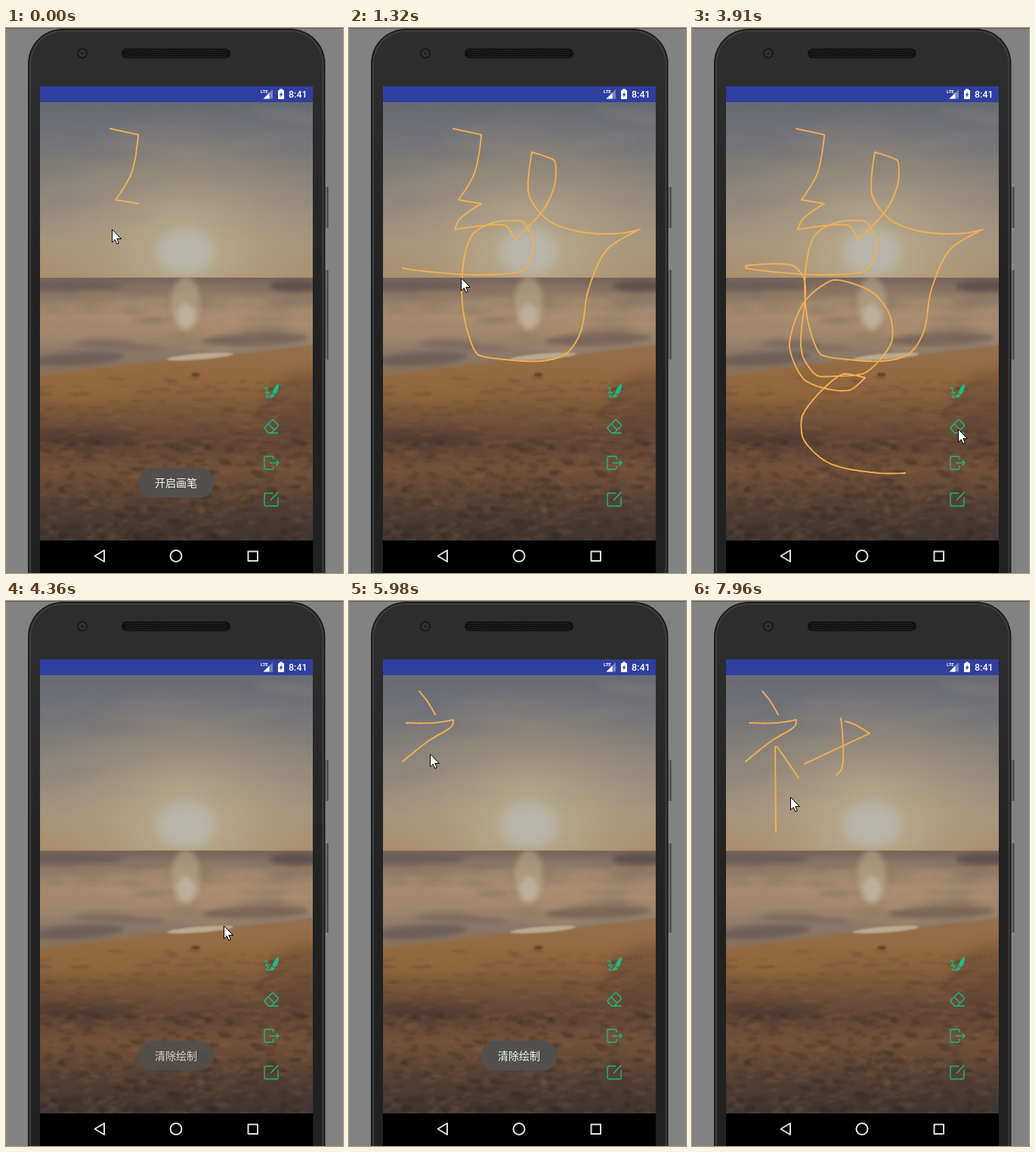
An HTML page with a canvas for the animation above (8 s loop, 446 px wide and 720 px high).

```html
<!DOCTYPE html>
<html lang="zh">
<head>
<meta charset="utf-8">
<style>
html, body { margin: 0; width: 100%; height: 100%; overflow: hidden; background: #828282; }
canvas { display: block; width: 446px; height: 720px; }
</style>
</head>
<body>
<canvas id="stage" width="446" height="720"></canvas>
<script>
const W = 446, H = 720, LOOP = 8000, CLEAR = 4170, STEP = 135;
const ctx = document.getElementById('stage').getContext('2d');

const clamp = (v, a = 0, b = 1) => Math.min(b, Math.max(a, v));
const mix = (a, b, u) => a + (b - a) * u;
const ramp = (t, a, b) => clamp((t - a) / (b - a));
const points = s => s.trim().split(/\s+/).map(p => p.split(',').map(Number));

// The screen refreshes in even steps of about STEP between these moments
const marks = [0, 120, 1170, 2280, 2520, 2800, 3910, 5050, 6100, 7180, 7960, LOOP];
function refresh(time) {
  const k = marks.findLastIndex(m => m <= time), span = marks[k + 1] - marks[k];
  const step = span / Math.max(1, Math.round(span / STEP));
  return marks[k] + Math.floor((time - marks[k]) / step) * step;
}

// Curve through key points: smooth on gentle turns, sharp at corners
function unit([ax, ay], [bx, by]) {
  const d = Math.hypot(bx - ax, by - ay) || 1;
  return [(bx - ax) / d, (by - ay) / d];
}
function heading(pts, k) {
  if (k === 0 || k === pts.length - 1) return [0, 0];
  const u = unit(pts[k - 1], pts[k]), v = unit(pts[k], pts[k + 1]);
  const bend = Math.max(0, u[0] * v[0] + u[1] * v[1]);
  return [0, 1].map(i => (u[i] + v[i]) / 2 * bend);
}
function at(pts, pos) {
  const k = Math.min(Math.floor(pos), pts.length - 2), u = pos - k, w = 1 - u;
  const p = pts[k], q = pts[k + 1], hp = heading(pts, k), hq = heading(pts, k + 1);
  const reach = Math.hypot(q[0] - p[0], q[1] - p[1]) * .36;
  return [0, 1].map(i => w * w * w * p[i] + 3 * w * w * u * (p[i] + hp[i] * reach)
    + 3 * w * u * u * (q[i] - hq[i] * reach) + u * u * u * q[i]);
}

// keys: [time, drawn up to point, cursor at point]
const moves = [];
const move = (path, keys) => moves.push({ pts: points(path), keys });
const stroke = (t0, t1, path) => {
  const n = points(path).length - 1;
  move(path, [[t0, 0, 0], [t1, n, n]]);
};
const hover = (t0, t1, path) => move(path, [[t0, 0, 0], [t1, 0, points(path).length - 1]]);

move(`138,133 175,141 166,192 145,227 175,232 146,253 140,266 208,261 220,279 258,239
  273,203 272,175 242,164 238,220 262,253 300,268 361,271 385,266 342,292 317,345
  306,403 290,428 268,438 207,438 170,431 152,380 154,296 165,271 195,256 230,256
  245,285 232,320 170,326 71,317 71,314 134,314 148,330 146,432 165,459 190,460
  230,455 264,415 262,380 240,350 187,333 150,360 129,420 148,464 180,477 210,478
  229,462 200,457 146,512 147,542 178,573 247,588 282,588`,
  [[0, 4, 5.88], [1020, 26, 27], [1300, 33, 35.85], [2130, 50, 50.2], [2510, 56, 56]]);
hover(2520, 2790, '281,590 281,590');
hover(2800, 3910, '283,591 340,600 374,590 352,530');
hover(3915, CLEAR, '352,530 352,530');
stroke(4850, 5050, '93,119 104,133 114,150');
stroke(5300, 5850, '76,161 112,161 138,157 137,164 105,185 71,212');
hover(5960, 5990, '107,202 107,202');
stroke(6090, 6500, '110,192 111,305');
stroke(6700, 7000, '112,192 125,210 141,234');
stroke(7180, 7500, '203,159 215,163 235,175 149,215');
stroke(7600, 7800, '197,155 198,222 191,230');
hover(7950, LOOP, '130,259 130,259');

function sample(keys, t, col) {
  let k = 0;
  while (k < keys.length - 2 && t >= keys[k + 1][0]) k++;
  return mix(keys[k][col], keys[k + 1][col], ramp(t, keys[k][0], keys[k + 1][0]));
}
const first = m => m.keys[0][0];
const last = m => m.keys.at(-1)[0];

function cursorAt(t) {
  const k = moves.findLastIndex(m => first(m) <= t);
  const m = moves[k], next = moves[k + 1], p = at(m.pts, sample(m.keys, t, 2));
  if (!next || t <= last(m)) return p;
  const u = ramp(t, last(m), first(next));
  return p.map((v, i) => mix(v, next.pts[0][i], u));
}

// Drawing helpers
function poly(c, pts, close) {
  c.beginPath();
  pts.forEach(([x, y]) => c.lineTo(x, y));
  if (close) c.closePath();
}
function area(c, path, fill) {
  poly(c, points(path), true);
  c.fillStyle = fill;
  c.fill();
}
function box(c, x, y, w, h, fill, r = 0) {
  c.beginPath();
  c.roundRect(x, y, w, h, r);
  c.fillStyle = fill;
  c.fill();
}
function blob(c, x, y, rx, ry, fill, turn = 0) {
  c.beginPath();
  c.ellipse(x, y, rx, ry, turn, 0, 7);
  c.fillStyle = fill;
  c.fill();
}
function fade(g, ...colours) {
  colours.forEach((col, i) => g.addColorStop(i / (colours.length - 1), col));
  return g;
}
const down = (c, y0, y1, ...colours) => fade(c.createLinearGradient(0, y0, 0, y1), ...colours);

let seed = 7;
const rnd = (a = 0, b = 1) => mix(a, b, (seed = seed * 16807 % 2147483647) / 2147483647);
function scatter(c, n, y0, y1, rx, ry, dark, light, tilt) {
  for (let i = 0; i < n; i++)
    blob(c, rnd(45, 406), rnd(y0, y1), rnd(rx / 3, rx), rnd(ry / 3, ry),
      rnd() < .5 ? dark : light, rnd(-tilt, tilt));
}

function sky(c) {
  box(c, 45, 98, 361, 233, down(c, 98, 330, '#676a72', '#737479', '#827e78', '#958b7e', '#a6957d', '#ab8d69'));
  c.filter = 'blur(5px)';
  scatter(c, 36, 110, 270, 80, 10, 'rgba(98,102,112,.12)', 'rgba(160,148,130,.12)', .15);
  c.filter = 'none';
  c.save();
  c.beginPath();
  c.rect(45, 98, 361, 231);
  c.clip();
  c.translate(238, 297);
  c.scale(1.15, 1);
  c.fillStyle = fade(c.createRadialGradient(0, 0, 15, 0, 0, 190),
    'rgba(188,176,148,.9)', 'rgba(180,164,134,.6)', 'rgba(170,154,128,.28)', 'rgba(160,146,126,0)');
  c.fillRect(-200, -200, 400, 240);
  c.filter = 'blur(8px)';
  blob(c, 0, -1, 33, 29, '#b7b4a9');
  c.restore();
}

function sea(c) {
  c.filter = 'none';
  box(c, 45, 330, 361, 135, down(c, 330, 455, '#75655d', '#8d7866', '#a48a6f', '#a0866d', '#8c7969', '#8a7056'));
  c.filter = 'blur(12px)';
  blob(c, 238, 372, 120, 24, 'rgba(184,156,122,.35)');
  c.filter = 'blur(3px)';
  blob(c, 80, 341, 75, 7, 'rgba(96,86,86,.6)');
  blob(c, 385, 341, 36, 8, 'rgba(84,72,70,.75)');
  scatter(c, 70, 350, 425, 38, 4, 'rgba(112,98,90,.26)', 'rgba(182,150,116,.28)', .06);
  blob(c, 238, 364, 19, 36, 'rgba(190,172,140,.55)');
  blob(c, 238, 380, 12, 16, 'rgba(192,184,166,.7)');
  blob(c, 95, 437, 62, 9, 'rgba(98,88,86,.7)', -.06);
  blob(c, 150, 420, 60, 5, 'rgba(106,94,90,.5)', .05);
  blob(c, 330, 411, 70, 8, 'rgba(98,84,78,.6)', -.03);
}

function sand(c) {
  c.filter = 'blur(1px)';
  area(c, '40,461 190,441 260,437 410,418 410,690 40,690', down(c, 425, 677,
    '#94704c', '#946a41', '#88613b', '#70513a', '#624738', '#71513a', '#5f4636', '#4b3b33', '#3f3531'));
  blob(c, 257, 434, 44, 4, 'rgba(190,172,146,.95)', -.08);
  c.filter = 'blur(8px)';
  blob(c, 110, 480, 70, 14, 'rgba(160,112,66,.35)');
  blob(c, 95, 544, 80, 12, 'rgba(62,46,40,.5)');
  blob(c, 400, 500, 60, 45, 'rgba(84,62,52,.35)');
  c.filter = 'blur(1.2px)';
  scatter(c, 260, 462, 560, 14, 2.5, 'rgba(64,46,38,.15)', 'rgba(156,112,70,.15)', .15);
  scatter(c, 480, 545, 677, 10, 4, 'rgba(44,34,31,.2)', 'rgba(136,98,66,.17)', .3);
  blob(c, 251, 458, 6, 2.5, 'rgba(84,56,40,.8)');
}

function beach(c) {
  c.save();
  c.beginPath();
  c.rect(45, 98, 361, 579);
  c.clip();
  sky(c);
  sea(c);
  sand(c);
  c.restore();
}

function phone(c) {
  box(c, 0, 0, W, H, '#828282');
  box(c, 0, 0, W, 1, '#5c5c5c');
  for (const [y, h] of [[210, 54], [320, 118]]) {
    box(c, 422, y, 4, h, '#6a6a6a');
    box(c, 425, y, 1.5, h, '#404040');
  }
  box(c, 29, 1, 393.5, 800, '#1c1c1c', 46);
  box(c, 31, 3, 389.5, 800, '#3e3e3e', 44);
  box(c, 33, 5, 385.5, 800, down(c, 60, 400, '#2d2d2d', '#212121'), 42);

  blob(c, 101, 33.5, 7, 7, '#1c1c1c');
  blob(c, 101, 33.5, 4.5, 4.5, '#38383a');
  blob(c, 101, 33.5, 2.5, 2.5, '#202226');
  box(c, 153, 27, 144, 13, '#121212', 6.5);
  for (let y = 0; y < 4; y++)
    for (let x = 0; x < 45; x++) box(c, 157 + x * 3 + y % 2 * 1.5, 29 + y * 2.7, 1.3, 1.3, '#2f2f2f');

  beach(c);
  statusBar(c);
  navBar(c);
  icons(c);
}

function statusBar(c) {
  const blue = '#303e9f';
  box(c, 45, 77, 361, 21, blue);
  area(c, '353,81 353,93.5 340.5,93.5', 'rgba(255,255,255,.35)');
  area(c, '348.5,85.5 348.5,93.5 340.5,93.5', '#fff');
  box(c, 360, 82, 8, 12, '#fff', 1);
  box(c, 362, 80.5, 4, 2, '#fff');
  area(c, '364.8,84 361.8,88.8 363.6,88.8 363.2,92 366.2,87.2 364.5,87.2', blue);
  c.fillStyle = '#fff';
  c.font = '700 6px Roboto, sans-serif';
  c.fillText('LTE', 337, 86);
  c.font = '500 12.5px Roboto, sans-serif';
  c.fillText('8:41', 374, 92);
}

function navBar(c) {
  box(c, 45, 677, 361, 43, '#000');
  c.strokeStyle = '#e0e0e0';
  c.lineWidth = 2;
  c.lineJoin = 'round';
  poly(c, points('130,690 130,705 117.5,697.5'), true);
  c.stroke();
  c.beginPath();
  c.arc(225, 697.5, 7.5, 0, 7);
  c.stroke();
  c.strokeRect(320.5, 691.5, 12.5, 12.5);
}

function icons(c) {
  const line = d => c.stroke(new Path2D(d));
  const fill = d => c.fill(new Path2D(d));
  c.strokeStyle = c.fillStyle = '#15bd88';
  c.lineWidth = 1.3;
  c.lineCap = c.lineJoin = 'round';

  line('M342 477c2-3 5-2 3.500 1s-3 5 0 3.500 3 1 1 3-3.500 3-1 3.500 3-1 4-2');
  fill('M361 470c.5 5-1 10-5 14l-3.500-2c1-5 4-10 8.500-12z');
  fill('M352 483l3.500 2c-1 2.500-3.500 3.500-7 3.500 2-1.500 2-4 3.500-5.500z');
  line('M343 527l8.500-8.500q1.500-1.500 3 0l5 5q1.500 1.500 0 3l-8.500 8.500h-3.500l-4.500-5q-1.500-1.500 0-3zM347 523l8 8M348 535h12');
  line('M354 569.500v-2q0-1.500-1.500-1.500h-9q-1.500 0-1.500 1.500v14q0 1.500 1.500 1.500h9q1.500 0 1.500-1.500v-2.500M349.500 574.500h11.500M358 571.500l3 3-3 3');
  line('M353 614.500h-9.500q-1.500 0-1.500 1.500v14q0 1.500 1.500 1.500h15q1.500 0 1.500-1.500v-10M350.500 623.500l9.500-10');
}

const backdrop = document.createElement('canvas');
backdrop.width = W;
backdrop.height = H;
phone(backdrop.getContext('2d'));

function drawLine(m, t) {
  const n = sample(m.keys, t, 1);
  if (n <= 0) return;
  const trail = [];
  for (let i = 0; i < n * 8; i++) trail.push(at(m.pts, i / 8));
  poly(ctx, [...trail, at(m.pts, n)]);
  ctx.stroke();
}

function toast(text, alpha) {
  if (alpha <= 0) return;
  ctx.globalAlpha = alpha;
  box(ctx, 175, 581, 100.5, 39.5, '#51504e', 19.7);
  ctx.fillStyle = '#f4f4f4';
  ctx.font = '14px "Noto Sans CJK SC", "Noto Sans CJK", sans-serif';
  ctx.textAlign = 'center';
  ctx.fillText(text, 225, 606);
  ctx.globalAlpha = 1;
}

const arrow = points('0,0 0,16.500 3.800,13 6.300,18.800 8.800,17.700 6.300,12 11.500,12');
function cursor([x, y]) {
  ctx.save();
  ctx.translate(Math.round(x) + .5, Math.round(y) + .5);
  poly(ctx, arrow, true);
  ctx.fillStyle = '#fff';
  ctx.strokeStyle = '#000';
  ctx.lineWidth = 1;
  ctx.fill();
  ctx.stroke();
  ctx.restore();
}

function draw(time) {
  const t = refresh(time);
  ctx.drawImage(backdrop, 0, 0);
  ctx.strokeStyle = '#f2ae50';
  ctx.lineWidth = 1.9;
  ctx.lineCap = ctx.lineJoin = 'round';
  for (const m of moves)
    if (t >= first(m) && (t < CLEAR || first(m) > CLEAR)) drawLine(m, t);
  toast('开启画笔', 1 - ramp(t, 380, 640));
  toast('清除绘制', ramp(t, 4100, 4400) * (1 - ramp(t, 6300, 6600)));
  cursor(cursorAt(t));
}

const start = performance.now();
function loop() {
  draw((performance.now() - start) % LOOP);
  requestAnimationFrame(loop);
}
loop();
</script>
</body>
</html>
```
